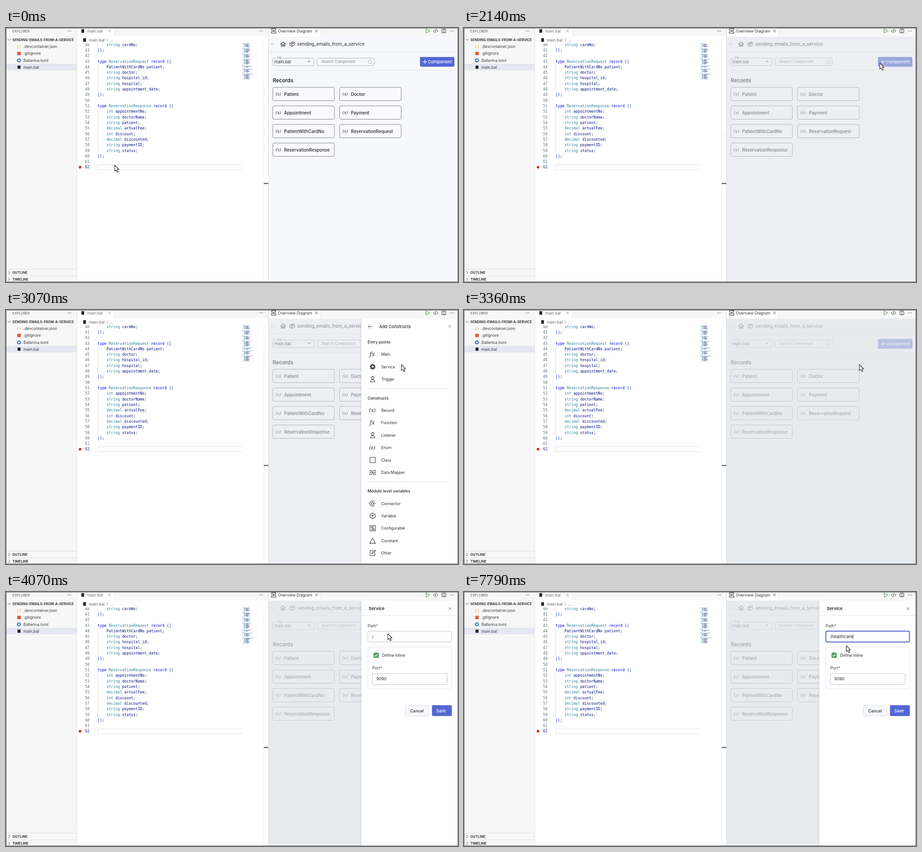
Write an HTML page with a canvas that moves like this. It is 998 px wide and 561 px high and loops after 8000 ms.

```html
<!DOCTYPE html>
<html lang="en">
<head>
<meta charset="utf-8">
<title>Add a service</title>
<style>
html, body { margin: 0; width: 100%; height: 100%; overflow: hidden; background: #fff; }
canvas { display: block; width: 998px; height: 561px; }
</style>
</head>
<body>
<canvas id="stage" width="998" height="561"></canvas>
<script>
const ctx = document.getElementById('stage').getContext('2d');
const LOOP = 8000;
const SANS = 'Inter, sans-serif';
const MONO = '"DejaVu Sans Mono", monospace';
const SERIF = '"Noto Serif", serif';
const INK = '#25272c', INDIGO = '#5567d5', TEAL = '#267f99', NAVY = '#001080', BLUE = '#0000f0';
const PANEL_X = 784.5, ROW = 27.4;

const clamp = v => Math.max(0, Math.min(1, v));
const slide = (t, start, length) => 213 * (1 - clamp((t - start) / length)) ** 3;

function rect(x, y, w, h, color) {
  ctx.fillStyle = color;
  ctx.fillRect(x, y, w, h);
}

function box(x, y, w, h, r, fill, stroke, width = 1) {
  ctx.beginPath();
  ctx.roundRect(x, y, w, h, r);
  if (fill) { ctx.fillStyle = fill; ctx.fill(); }
  if (stroke) { ctx.strokeStyle = stroke; ctx.lineWidth = width; ctx.stroke(); }
}

// y is the middle of the capitals
function text(str, x, y, size, color = INK, weight = 400, family = SANS) {
  ctx.font = `${weight} ${size}px ${family}`;
  ctx.fillStyle = color;
  ctx.fillText(str, x, y + size * 0.36);
  return ctx.measureText(str).width;
}

function icon(d, x, y, color = INK, width = 1, fill = false) {
  ctx.save();
  ctx.translate(x, y);
  const path = new Path2D(d);
  ctx.lineJoin = ctx.lineCap = 'round';
  ctx.strokeStyle = ctx.fillStyle = color;
  ctx.lineWidth = width;
  if (fill) ctx.fill(path, 'evenodd'); else ctx.stroke(path);
  ctx.restore();
}

const circle = r => `M${r} 0A${r} ${r} 0 1 1 ${-r} 0A${r} ${r} 0 1 1 ${r} 0Z`;

function gearPath(r) {
  let d = '';
  for (let i = 0; i < 32; i++) {
    const a = i * Math.PI / 16, q = i % 4 < 2 ? r : r * 0.76;
    d += `${i ? 'L' : 'M'}${q * Math.cos(a)} ${q * Math.sin(a)}`;
  }
  return d + 'Z' + circle(r * 0.38);
}

const D = {
  play: 'M-3.5 -4.5L4 0L-3.5 4.5Z',
  bug: 'M-3 -1A3 3 0 0 1 3 -1V2A3 3 0 0 1 -3 2ZM-4.5 -3L-3 -1M4.5 -3L3 -1M-5 1H-3M3 1H5M-4 5L-2.5 3.5M4 5L2.5 3.5M-3 -1H3',
  diagram: 'M-4.5 -5H4.5V-1.5H-4.5ZM0 -1.5V1.5M-5 1.5H5V5H-5Z',
  split: 'M-4 -4H4V4H-4ZM0 -4V4',
  code: 'M-2.5 -3L-5 0L-2.5 3M2.5 -3L5 0L2.5 3M1 -4L-1 4',
  close: 'M-2.7 -2.7L2.7 2.7M2.7 -2.7L-2.7 2.7',
  right: 'M-1.5 -3L1.5 0L-1.5 3',
  down: 'M-3 -1.5L0 1.5L3 -1.5',
  back: 'M4.5 0H-4.5M-0.5 -4L-4.5 0L-0.5 4',
  home: 'M-5.2 0L0 -4.8L5.2 0M-3.7 -1V4.7H-1.2V1H1.2V4.7H3.7V-1',
  cube: 'M-5 -2L1 -5L5 -3V2.5L-1 5L-5 3ZM-5 -2L-1 0L5 -3M-1 0V5M-2 -3.5L2 -1.5',
  person: 'M-2.8 -2.8A2.8 2.8 0 1 1 2.8 -2.8A2.8 2.8 0 1 1 -2.8 -2.8M-5 6C-5 -0.5 5 -0.5 5 6Z',
  square: 'M-6 -6H6V6H-6Z',
  mapper: 'M-6 -4H-2M2 -4H6M-6 0H6M-6 4H-2M2 4H6M-2 -4L2 4M-6 -5V-3M-2 -5V-3M2 -5V-3M6 -5V-3M-6 3V5M-2 3V5M2 3V5M6 3V5M-6 -1V1M6 -1V1',
  connector: 'M4 -4.4A6 6 0 1 0 4 4.4M-6 0H-8M6.5 0H2.3M2.3 0A2.3 2.3 0 1 1 -2.3 0A2.3 2.3 0 1 1 2.3 0',
  hexagon: 'M0 -6.3L5.7 -3.2V3.2L0 6.3L-5.7 3.2V-3.2ZM-3 -1.7L0 0L3 -1.7M0 0V3.4',
  sliders: 'M-5.8 -6H-1.2V6H-5.8ZM1.2 -6H5.8V6H1.2ZM-3.5 -3.5V-1M3.5 1V3.5',
  triangle: 'M0 -6L6.3 6H-6.3Z',
  edit: 'M1 -5.5H-5.5V6H5V0M-2 2L-1.3 -1L5 -6.5L6.5 -5L0.5 1.4Z',
  gear: gearPath(6.5),
  smallGear: gearPath(5),
  pointer: 'M0 0V13.2L3.1 10.4L5.4 15.6L7.8 14.5L5.5 9.5H9.4Z'
};

function dots(x, y) {
  for (let i = -1; i <= 1; i++) rect(x + i * 3.2 - 0.7, y - 0.7, 1.4, 1.4, '#444');
}

function sidebar() {
  rect(0, 0, 157, 561, '#f7f7f7');
  rect(156, 0, 1, 561, '#e4e4e4');
  text('EXPLORER', 14, 7, 7.5, '#55585c');
  dots(140, 6.5);
  icon(D.down, 7, 26, '#444');
  text('SENDING-EMAILS-FROM-A-SERVICE', 14, 26, 7.5, '#3b3b3b', 700);
  rect(0, 79, 156, 14.5, '#e4e6f1');
  text('{ }', 24, 41, 8, '#d9a637', 500);
  rect(25, 52.5, 7.5, 7.5, '#df5a35');
  icon(D.smallGear, 28.5, 71.5, '#3f82c4', 1, true);
  rect(25.5, 83, 6.5, 7, '#222');
  ['.devcontainer.json', '.gitignore', 'Ballerina.toml', 'main.bal']
    .forEach((name, i) => text(name, 38.5, 41.3 + i * 15.05, 8.65, '#3b3b3b'));
  ['OUTLINE', 'TIMELINE'].forEach((name, i) => {
    const y = 540 + i * 15;
    rect(0, y - 8, 156, 1, '#dedede');
    icon(D.right, 7, y, '#444');
    text(name, 14, y, 7.6, '#3b3b3b', 700);
  });
}

const code = {
  40: 'string cardNo', 43: 'ReservationRequest', 44: 'PatientWithCardNo patient', 45: 'string doctor',
  46: 'string hospital_id', 47: 'string hospital', 48: 'string appointment_date',
  51: 'ReservationResponse', 52: 'int appointmentNo', 53: 'string doctorName', 54: 'string patient',
  55: 'decimal actualFee', 56: 'int discount', 57: 'decimal discounted', 58: 'string paymentID', 59: 'string status'
};

function runs(x, y, parts) {
  for (const [str, color] of parts) x += text(str, x, y, 8.19, color, 400, MONO);
}

function codeLine(n) {
  const y = 73.6 + (n - 43) * 12.31;
  text(String(n), 174.5, y, 8.19, n === 62 ? '#0b216f' : '#5d6f78', 400, MONO);
  if ([41, 49, 60].includes(n)) {
    runs(202.3, y, [['|', NAVY], ['}', '#0431fa'], [';', '#222']]);
  } else if (n === 43 || n === 51) {
    runs(202.3, y, [['type ', BLUE], [code[n], TEAL], [' record ', BLUE], ['{', '#0431fa'], ['|', NAVY]]);
  } else if (code[n]) {
    rect(202, y - 6.2, 1, 12.4, '#dedede');
    const [type, name] = code[n].split(' ');
    runs(222, y, [[type + ' ', n === 44 ? NAVY : TEAL], [name, NAVY], [';', '#222']]);
  }
}

function minimap() {
  const heads = [2, 10, 19, 27, 38, 43, 51], ends = [8, 17, 25, 36, 41, 49, 60];
  heads.forEach((head, k) => {
    for (let n = head; n <= ends[k]; n++) {
      const y = 33 + (n - 1) * 1.36;
      if (n === head) {
        rect(522, y, 3, 0.9, '#7777ee');
        rect(525.5, y, 7 + k * 1.4, 0.9, '#7fb0c0');
        rect(533 + k * 1.4, y, 4, 0.9, '#8888ee');
      } else if (n === ends[k]) {
        rect(522, y, 2, 0.9, '#99a');
      } else {
        rect(525, y, 4.5, 0.9, '#7fb0c0');
        rect(530, y, 4 + (n * 7 % 5) * 1.2, 0.9, '#6570a8');
      }
    }
  });
}

function editorTools(t) {
  const shift = t >= 2000 ? -17.5 : 0;
  icon(D.play, 491.5 + shift, 6.5, '#388a34');
  icon(D.bug, 508.5 + shift, 6.5, '#444');
  icon(D.diagram, 527 + shift, 6.5, '#333');
  if (shift) icon(D.code, 527, 6.5, '#444');
  icon(D.split, 545.5, 6.5, '#444');
}

function editor(t, focused) {
  rect(157, 0, 422, 561, '#fff');
  ctx.save();
  ctx.beginPath();
  ctx.rect(157, 34, 422, 527);
  ctx.clip();
  for (let n = 40; n <= 62; n++) codeLine(n);
  ctx.restore();
  for (const y of [301.5, 312.5]) rect(202, y, 318, 1, '#dfdfdf');
  rect(202, 301.5, 1, 12, '#dfdfdf');
  if (focused && (t - 140) % 1000 < 500) rect(202, 301.5, 1.6, 12.5, '#111');
  icon(circle(3), 163.5, 307.5, '#d8301f', 1, true);
  minimap();

  const bar = clamp((t - 140) / 100) * (1 - clamp((t - 1500) / 700));
  rect(569, 34, 1, 527, '#ededed');
  rect(569, 234, 10, 218, `rgba(100,100,100,${0.34 * bar})`);
  rect(569, 342.5, 10, 1.8, '#333');

  rect(157, 0, 422, 18, '#f7f7f7');
  rect(157, 0, 82, 18, '#fff');
  rect(239, 0, 1, 18, '#e6e6e6');
  rect(166.5, 2.5, 6, 8, '#222');
  text('main.bal', 179, 7, 8.7, focused ? '#333' : '#6b6b6b');
  icon(D.close, 228.5, 6.5, focused ? '#333' : '#8a8a8a', 0.9);
  if (focused) editorTools(t);
  dots(563, 6.5);
  rect(170.5, 22.5, 6, 8, '#222');
  text('main.bal', 183, 26.5, 8.7, '#666');
  icon(D.right, 223.5, 26.5, '#777', 0.9);
  text('...', 229, 26.5, 8.7, '#666');
}

function card(name, i, pointer) {
  const x = 589 + (i % 2) * 147.5, y = 131 + Math.floor(i / 2) * 41;
  const hover = pointer.x > x && pointer.x < x + 136 && pointer.y > y && pointer.y < y + 29.5;
  box(x, y, 136, 29.5, 3.5, hover ? '#e2e4f5' : '#fafafc', hover ? INDIGO : '#7c7f86');
  const color = hover ? INDIGO : INK;
  text('(x)', x + 6.5, y + 14.5, 9.2, color, 'italic 500', SERIF);
  text(name, x + 25, y + 15.2, 9.7, color, 500);
}

function overview(t, focused, pointer) {
  rect(579, 0, 419, 19, '#f7f7f7');
  rect(580, 0, 114, 19, '#fff');
  rect(694, 0, 1, 18, '#e6e6e6');
  rect(579, 19, 419, 542, '#f7f8fb');
  rect(579, 0, 1, 561, '#d5d7da');
  icon(D.diagram, 591, 6.5, '#333', 1.1);
  text('Overview Diagram', 600.5, 7, 8.7, focused ? '#333' : '#777');
  icon(D.close, 685.5, 6.5, focused ? '#333' : '#999', 0.9);
  if (focused) {
    icon(D.play, 931.5, 6.5, '#388a34');
    icon(D.code, 948.5, 6.5, '#333');
    icon(D.split, 967, 6.5, '#333');
  }
  dots(984.5, 6.5);

  icon(D.back, 590, 35.5, '#c3c6cc');
  icon(D.home, 611.8, 35.5, '#333', 1.2);
  icon(D.cube, 632, 35.5, '#333');
  text('sending_emails_from_a_service', 643, 35.5, 10, INK);
  rect(580, 52.5, 418, 1, '#dfe1e8');

  box(589, 66.5, 91, 16.5, 2.5, null, '#a4a8b0', 0.9);
  rect(596.5, 64, 14.5, 5, '#f7f8fb');
  text('File', 598.5, 65.5, 6.2, '#5f636a');
  text('main.bal', 592.5, 75, 9.2, INK);
  icon('M-3 -1.6H3L0 1.6Z', 669, 74, '#666', 1, true);
  box(687, 66.5, 126, 16.5, 2.5, null, '#a4a8b0', 0.9);
  text('Search Component', 696, 74.5, 8.3, '#7b7f86');
  icon(circle(3.8) + 'M2.7 2.7L4.2 4.2', 803.5, 74.7, '#a4a8b0');
  box(914, 64, 76, 21.5, 3, INDIGO);
  icon('M-4 0H4M0 -4V4', 925, 74.7, '#fff', 1.3);
  text('Component', 931.5, 74.8, 9.5, '#fff', 500);
  rect(589, 93, 401, 1, '#dfe1e8');

  text('Records', 589, 116, 11.4, INK, 600);
  ['Patient', 'Doctor', 'Appointment', 'Payment', 'PatientWithCardNo', 'ReservationRequest', 'ReservationResponse']
    .forEach((name, i) => card(name, i, pointer));

  const dim = t < 2140 ? 0 : t < 3360 ? 0.5 : 0.7;
  rect(580, 19, 418, 542, `rgba(226,229,233,${dim})`);
}

function sheet(x) {
  ctx.save();
  ctx.shadowColor = 'rgba(60,65,80,.35)';
  ctx.shadowBlur = 5;
  rect(x, 19, 230, 545, '#fff');
  ctx.restore();
}

function group(x, title, y, items) {
  text(title, x + 14, y, 8.8, INK, 500);
  items.forEach(([name, kind], i) => {
    const iy = y + 27.2 + i * ROW;
    if (D[kind]) icon(D[kind], x + 25, iy, '#333', 1.1, kind === 'gear');
    else text(kind, x + (kind === 'fx' ? 18.5 : 17), iy - 0.5, kind === 'fx' ? 13 : 11.5, '#333', 'italic 500', SERIF);
    text(name, x + 44, iy + 0.3, 8.6, INK, 400);
  });
}

function constructs(x) {
  sheet(x);
  icon(D.back, x + 20, 36.5, '#555');
  text('Add Constructs', x + 39.5, 36.5, 9.4, INK, 500);
  icon(D.close, x + 195.3, 36.5, '#666', 0.9);
  group(x, 'Entry points', 70.7, [['Main', 'fx'], ['Service', 'gear'], ['Trigger', 'person']]);
  rect(x + 14, 172.7, 178, 1, '#dfe1e6');
  group(x, 'Constructs', 194.5, [['Record', '(x)'], ['Function', 'fx'], ['Listener', 'person'],
    ['Enum', '(e)'], ['Class', 'square'], ['Data Mapper', 'mapper']]);
  rect(x + 14, 378.5, 178, 1, '#dfe1e6');
  group(x, 'Module level variables', 400, [['Connector', 'connector'], ['Variable', 'hexagon'],
    ['Configurable', 'sliders'], ['Constant', 'triangle'], ['Other', 'edit']]);
}

function required(label, x, y) {
  const w = text(label, x, y, 9, '#3a3d43');
  text('*', x + w, y, 9, '#c9302c');
}

const keyTimes = [5790, 6000, 6140, 6500, 6860, 7070, 7290, 7360, 7710, 7790];

function serviceForm(x, t) {
  sheet(x);
  text('Service', x + 16.5, 36.5, 9.5, INK, 600);
  icon(D.close, x + 195.8, 37, '#666', 0.9);
  rect(x, 51, 230, 1, '#e0e2e8');

  required('Path', x + 14, 74.5);
  const active = t >= 4290;
  box(x + 14.5, 86.5, 184.5, 24, 3, '#fff', active ? '#4d5cc4' : '#b9bdc7', active ? 1.8 : 1);
  const typed = '/' + 'healthcare'.slice(0, keyTimes.filter(k => t >= k).length);
  const w = text(typed, x + 24, 99, 9.3, INK);
  if (t >= 5210) rect(x + 24.2 + w, 93.5, 0.9, 10.5, '#222');

  box(x + 14.5, 121.5, 185, 92.5, 4, '#fff', '#e4e6ec');
  box(x + 27, 134, 11.5, 11.5, 2, '#4b9f6b');
  icon('M-3 0.2L-1 2.4L3.2 -2.3', x + 32.8, 139.8, '#fff', 1.4);
  text('Define Inline', x + 46, 139.8, 8.6, INK);
  required('Port', x + 24.3, 168);
  box(x + 24.5, 180, 165, 24.5, 3, '#fff', '#b9bdc7');
  text('9090', x + 33.5, 192.3, 8.8, INK);

  box(x + 97, 250.5, 52.5, 23.5, 3, '#f6f7fa', '#dddfe6');
  text('Cancel', x + 108, 262.5, 9, INK, 500);
  box(x + 156, 250, 44, 24, 3, INDIGO);
  text('Save', x + 165.5, 262.5, 9.2, '#fff', 500);
}

const pointerKeys = [
  [0, 240, 303], [500, 240, 303], [780, 370, 288], [1000, 600, 250], [1210, 751, 218], [1360, 855, 90],
  [1500, 903, 80], [1860, 918, 77.5], [2540, 918, 77.5], [2800, 890, 108], [3070, 873, 120.5], [3540, 873, 120.5],
  [3640, 867, 112], [3850, 849, 97], [4070, 843, 92], [4430, 843, 92], [4710, 844, 118.5], [LOOP, 844, 118.5]
];

function pointerAt(t) {
  const i = pointerKeys.findIndex(k => k[0] > t);
  const [t0, x0, y0] = pointerKeys[i - 1], [t1, x1, y1] = pointerKeys[i];
  const p = (t - t0) / (t1 - t0);
  return { x: x0 + (x1 - x0) * p, y: y0 + (y1 - y0) * p };
}

function draw(t) {
  const editing = t >= 140 && t < 2140;
  const pointer = pointerAt(t);
  sidebar();
  editor(t, editing);
  overview(t, !editing, pointer);
  ctx.save();
  ctx.beginPath();
  ctx.rect(580, 19, 418, 542);
  ctx.clip();
  if (t >= 2270 && t < 3360) constructs(PANEL_X + slide(t, 2270, 370));
  if (t >= 3540) serviceForm(PANEL_X + slide(t, 3540, 250), t);
  ctx.restore();
  icon(D.pointer, pointer.x, pointer.y, '#fff', 1, true);
  icon(D.pointer, pointer.x, pointer.y, '#222', 1.1);
  box(0.5, 0.5, 997, 560, 0, null, '#6c6d70');
}

const start = performance.now();
function tick() {
  draw((performance.now() - start) % LOOP);
  requestAnimationFrame(tick);
}
tick();
</script>
</body>
</html>
```
